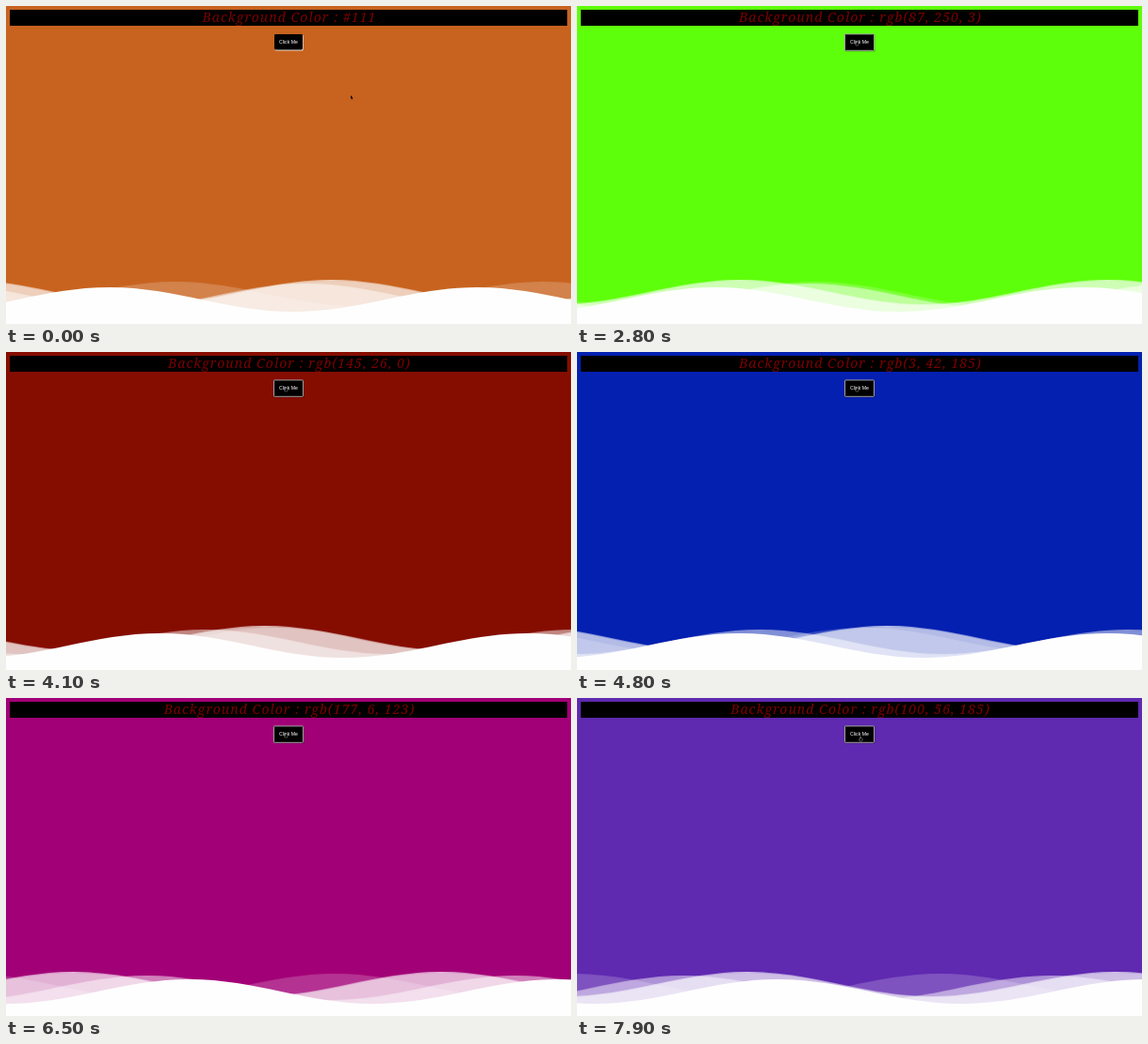
These frames come from a looping animation (600 px wide and 338 px high, 8000 ms). An HTML page:

```html
<!DOCTYPE html>
<html lang="en">
<head>
<meta charset="utf-8">
<title>Background colour changer</title>
<style>
  html, body { margin: 0; width: 100%; height: 100%; overflow: hidden; }
  svg { display: block; width: 600px; height: 338px; animation: paint 8s step-end infinite; }

  @keyframes paint {
    0%     { background: #c8631f; }
    34.9%  { background: #5eff0a; }
    49.9%  { background: #850d00; }
    58.7%  { background: #0420b0; }
    79.9%  { background: #a20077; }
    88.7%  { background: #5f29b0; }
  }

  /* Titles are stacked 40px apart; the strip jumps one up per click. */
  .titles { animation: titles 8s step-end infinite; }
  .titles text {
    font: italic 500 14px "Noto Serif", serif;
    letter-spacing: 1.05px;
    fill: #7c0000;
    text-anchor: middle;
  }
  @keyframes titles {
    0%     { transform: translateY(0); }
    34.9%  { transform: translateY(-40px); }
    49.9%  { transform: translateY(-80px); }
    58.7%  { transform: translateY(-120px); }
    79.9%  { transform: translateY(-160px); }
    88.7%  { transform: translateY(-200px); }
  }

  .label { font: 5.2px "Liberation Sans", Arial, sans-serif; fill: #fff; text-anchor: middle; }
  .idle, .arrow { animation: before 8s step-end infinite; }
  .hover, .hand { animation: after 8s step-end infinite; }
  @keyframes before { 0% { opacity: 1; } 31% { opacity: 0; } }
  @keyframes after  { 0% { opacity: 0; } 31% { opacity: 1; } }

  .cursor { animation: point 8s linear infinite; }
  @keyframes point {
    0%        { transform: translate(366px, 95px); }
    20%       { transform: translate(352.5px, 69px); }
    31%, 93%  { transform: translate(297px, 37px); }
    97%, 100% { transform: translate(301px, 41px); }
  }

  /* --x: crest at the start, --d: distance covered in one loop */
  .wave { fill: #fefefe; animation: drift 8s linear infinite; }
  @keyframes drift {
    from { transform: translate(var(--x), var(--y)); }
    to   { transform: translate(calc(var(--x) + var(--d)), var(--y)); }
  }
</style>
</head>
<body>
<svg viewBox="0 0 600 338">
  <defs>
    <clipPath id="bar"><rect x="4" y="4" width="592" height="17"/></clipPath>
    <path id="swell" d="M-781.25 0
      c71.13 0 124.18 26 195.3125 26 s124.18 -26 195.3125 -26
      s124.18 26 195.3125 26 s124.18 -26 195.3125 -26
      s124.18 26 195.3125 26 s124.18 -26 195.3125 -26
      s124.18 26 195.3125 26 s124.18 -26 195.3125 -26
      v60 H-781.25z"/>
  </defs>

  <rect x="4" y="4" width="592" height="17"/>
  <g clip-path="url(#bar)">
    <g class="titles">
      <text x="301" y="17">Background Color : #111</text>
      <text x="301" y="57">Background Color : rgb(87, 250, 3)</text>
      <text x="301" y="97">Background Color : rgb(145, 26, 0)</text>
      <text x="301" y="137">Background Color : rgb(3, 42, 185)</text>
      <text x="301" y="177">Background Color : rgb(177, 6, 123)</text>
      <text x="301" y="217">Background Color : rgb(100, 56, 185)</text>
    </g>
  </g>

  <g class="idle">
    <rect x="285.5" y="30.6" width="30.2" height="16.9" rx="1.5" fill="#e6ded0"/>
    <rect x="285" y="30" width="30" height="16.4" rx="1.3"/>
  </g>
  <g class="hover">
    <rect x="285" y="30.5" width="31.4" height="18" fill="#000" opacity=".3"/>
    <rect x="284.5" y="29.9" width="31" height="17.4" rx=".6" stroke="#a0a0a0"/>
  </g>
  <text class="label" x="300" y="40">Click Me</text>

  <g class="wave" style="--x: 319px; --y: 295.1px; --d: -208.3px" opacity=".5"><use href="#swell"/></g>
  <g class="wave" style="--x: 180px; --y: 293.1px; --d: 208.3px" opacity=".2"><use href="#swell"/></g>
  <g class="wave" style="--x: -45.6px; --y: 291.2px; --d: 625px" opacity=".7"><use href="#swell"/></g>
  <g class="wave" style="--x: 110px; --y: 299px; --d: 104.2px"><use href="#swell"/></g>

  <g class="cursor">
    <path class="arrow" d="M0 0 V3.7 L.8 3 L1.4 4.4 L2.1 4.1 L1.5 2.8 H2.6z"/>
    <path class="hand" d="M-.4 0 H.4 V1.7 L2.2 2.1 V3.5 L1.6 5 H-.7 L-1.8 3 L-1.2 2.6 L-.4 3.2z" stroke="#fff" stroke-width=".3"/>
  </g>
</svg>
</body>
</html>
```
